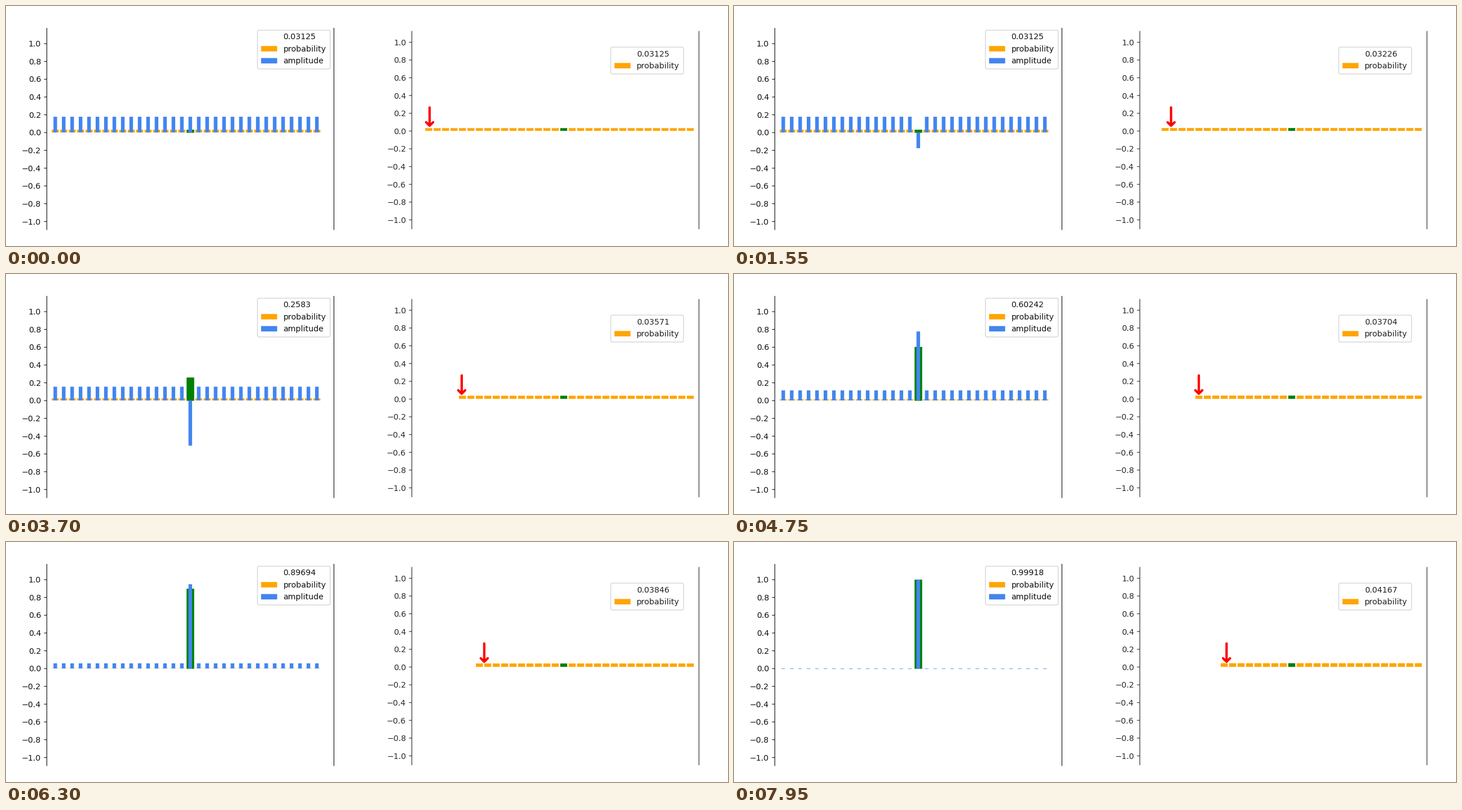
Animation of 1280x427 px, one loop 8000 ms. Source, as a matplotlib script:

```python
import math

import matplotlib.pyplot as plt
from matplotlib.animation import FuncAnimation
from matplotlib.patches import FancyBboxPatch, Rectangle

WIDTH, HEIGHT, DPI = 1280, 427, 100
FRAME_MS, LOOP_MS = 50, 8000
STEP_MS = 973
ITEMS, MARKED = 32, 16
ORANGE, BLUE, GREEN, RED = "#ffa500", "#4285f0", "#008000", "#ff0000"
PITCH = 14.96
PT = 72 / DPI

plt.rcParams["font.family"] = "DejaVu Sans"
# The small surplus keeps the pixel size from being truncated down.
fig = plt.figure(figsize=((WIDTH + 0.01) / DPI, (HEIGHT + 0.01) / DPI),
                 dpi=DPI, facecolor="white")
ax = fig.add_axes([0, 0, 1, 1])
ax.set(xlim=(0, WIDTH), ylim=(HEIGHT, 0))
ax.axis("off")


def rect(x, y, w, h, color, z=2):
    patch = Rectangle((x, y), w, h, facecolor=color, edgecolor="none",
                      linewidth=0, zorder=z, snap=False)
    return ax.add_patch(patch)


def line(xs, ys, color, width, z=1, cap="butt"):
    return ax.plot(xs, ys, color=color, lw=width * PT, zorder=z, snap=False,
                   solid_capstyle=cap, solid_joinstyle="round")[0]


def label(x, y, text, color, ha="left"):
    return ax.text(x, y, text, color=color, ha=ha, va="baseline",
                   fontsize=14.1 * PT, zorder=6)


def axes_frame(left, right, top, bottom, zero, unit, color):
    """Side lines, ticks and tick labels of one chart."""
    for x in (left, right):
        line([x, x], [top, bottom], color, 1.15)
    for k in range(-5, 6):
        y = zero - k / 5 * unit
        line([left - 5, left], [y, y], color, 1.1)
        text = f"{k / 5:.1f}".replace("-", "\u2212")
        label(left - 10.3, y + 5.2, text, color, "right")


def legend(x, y, height, entries, color):
    """Legend box with a value line on top; returns the value text."""
    ax.add_patch(FancyBboxPatch((x + 3, y + 3), 123, height - 6,
                                boxstyle="round,pad=3,rounding_size=3",
                                facecolor="white", edgecolor="#d2d2d2",
                                linewidth=1.3 * PT, zorder=4))
    for i, (name, fill) in enumerate(entries, 1):
        base = y + 16.4 + 21.4 * i
        rect(x + 6.5, base - 9.6, 28.5, 9.6, fill, 5)
        label(x + 45.7, base, name, color)
    return label(x + 45.7, y + 16.4, "", color)


def bar_row(first, width, color, z):
    return [rect(first + i * PITCH - width / 2, 0, width, 0, color, z)
            for i in range(ITEMS)]


def set_bar(bar, value, base, unit):
    bar.set_y(base - value * unit)
    bar.set_height(value * unit)


LEFT_ZERO, LEFT_UNIT = 225.0, 158.2
RIGHT_ZERO, RIGHT_UNIT = 222.2, 158.0

axes_frame(72.4, 581.4, 39, 398.5, LEFT_ZERO + 0.2, LEFT_UNIT, "#111111")
axes_frame(719.5, 1228.5, 44.5, 397, RIGHT_ZERO + 0.3, RIGHT_UNIT, "#2a2a2a")
left_value = legend(445.7, 43, 69, [("probability", ORANGE), ("amplitude", BLUE)], "#111111")
right_value = legend(1072.2, 73.2, 47.8, [("probability", ORANGE)], "#222222")

left_prob = bar_row(87.35, 12.4, ORANGE, 2)
left_amp = bar_row(87.35, 6.4, BLUE, 3)
right_prob = bar_row(749.4, 12.4, ORANGE, 2)
left_prob[MARKED].set(facecolor=GREEN, x=320.1, width=13.5)
right_prob[MARKED].set_facecolor(GREEN)

shaft = line([], [], RED, 4.2, 5, "round")
head = line([], [], RED, 4.2, 5, "round")


def draw_search(t):
    """Amplitude amplification: a sign flip, then a reflection, in turn."""
    step = max(0, (t - 77) // STEP_MS)
    angle = (2 * (step // 2) + 1) * math.asin(1 / math.sqrt(ITEMS))
    marked = math.sin(angle)
    rest = math.cos(angle) / math.sqrt(ITEMS - 1)
    sign = -1 if step % 2 else 1
    for i in range(ITEMS):
        hit = i == MARKED
        amp = marked if hit else rest
        set_bar(left_prob[i], amp ** 2, LEFT_ZERO, LEFT_UNIT)
        set_bar(left_amp[i], sign * amp if hit else amp, LEFT_ZERO, LEFT_UNIT)
    green = left_prob[MARKED]
    green.set_height(green.get_height() + 0.6)
    left_value.set_text(str(round(marked ** 2, 5)))


def draw_scan(t):
    """Linear scan: checked items drop out, the others share the probability."""
    checked = (t + 300) // STEP_MS
    share = 1 / (ITEMS - checked)
    for i, bar in enumerate(right_prob):
        set_bar(bar, share if i >= checked else 0, RIGHT_ZERO, RIGHT_UNIT)
    right_value.set_text(str(round(share, 5)))
    x = 751 + t * PITCH / STEP_MS
    shaft.set_data([x, x], [180.5, 212])
    head.set_data([x - 6.2, x, x + 6.2], [206.8, 213, 206.8])


def update(frame):
    t = frame * FRAME_MS
    draw_search(t)
    draw_scan(t)
    return []


anim = FuncAnimation(fig, update, frames=LOOP_MS // FRAME_MS,
                     interval=FRAME_MS, repeat=True, repeat_delay=0, blit=False)
plt.show()
```
